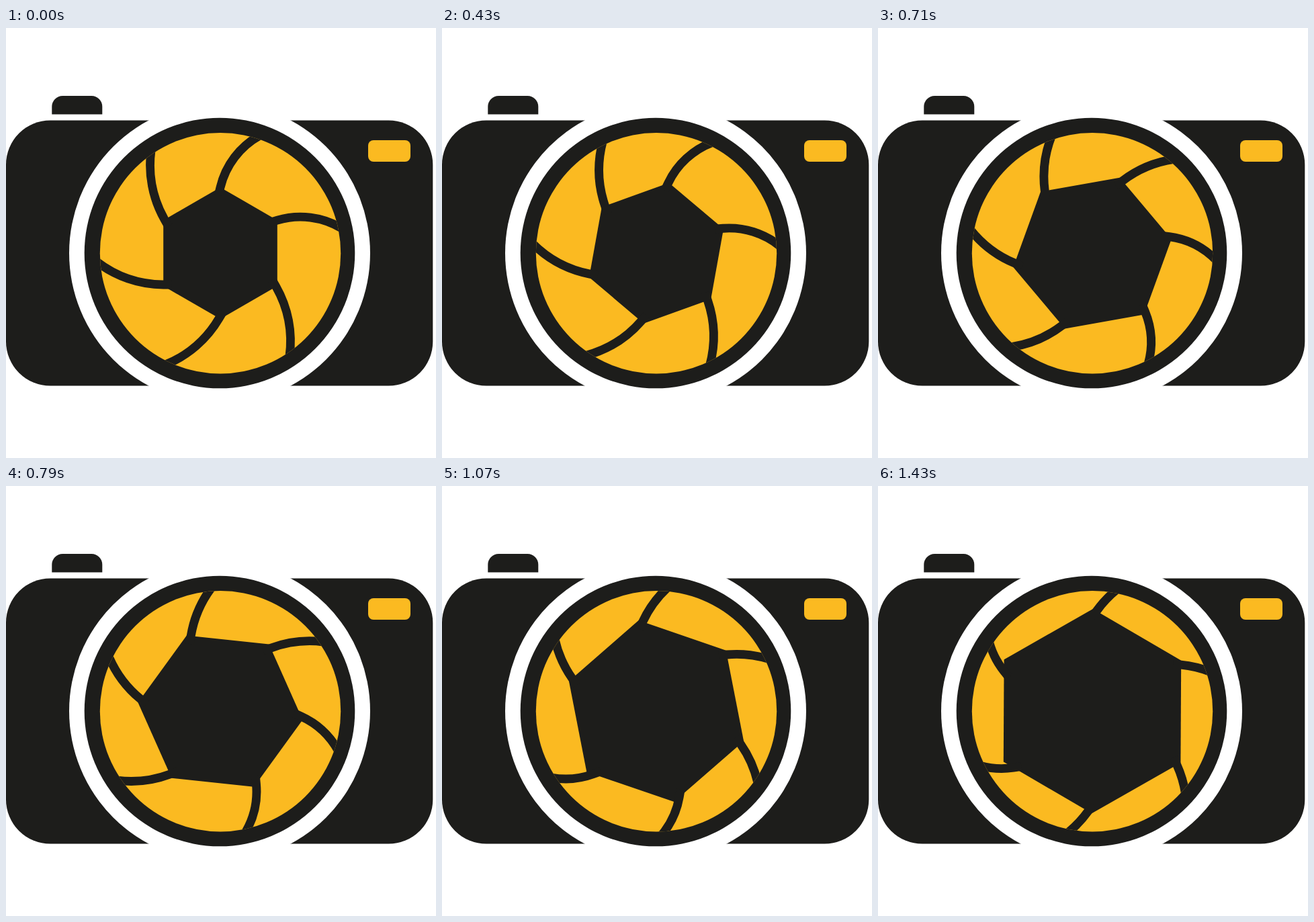
Animation, 640 px wide and 640 px high, one loop 1.93 s. Source, as an HTML page:

```html
<!DOCTYPE html>
<html lang="en">
<head>
<meta charset="utf-8">
<title>Camera shutter</title>
<style>
  html, body { margin: 0; height: 100%; overflow: hidden; background: #fff; }
  svg { display: block; width: 100%; height: 100%; }
  .ink { fill: #1d1d1b; }
  .gold { fill: #fbba21; }
  .seam { fill: none; stroke: #1d1d1b; stroke-width: 12.9; }
</style>
</head>
<body>
<svg viewBox="0 0 640 640">
  <clipPath id="lens"><circle cx="319" cy="335.2" r="179.2"/></clipPath>
  <rect class="ink" y="137.5" width="635.3" height="395" rx="66"/>
  <path class="ink" d="M68.3 128.4V117a16 16 0 0 1 16-16h43a16 16 0 0 1 16 16v11.4z"/>
  <rect class="gold" x="539" y="166.9" width="63" height="32.1" rx="8"/>
  <circle cx="318" cy="335" r="224" fill="#fff"/>
  <circle class="ink" cx="318" cy="335" r="201.3"/>
  <g clip-path="url(#lens)">
    <circle class="gold" cx="319" cy="335.2" r="181"/>
    <g id="iris"></g>
  </g>
</svg>
<script>
const LOOP = 1930, LAST = 17;
const RIM = 185, TUCK = 12, LAG = 7.6;
const RAD = Math.PI / 180;

// [step, degrees turned]
const TURNS = [[0, 0], [3, 10.2], [5, 48.7], [8, 96], [10, 134.5], [14, 201], [LAST, 240.3]];

const iris = document.getElementById('iris');
function add(tag, cls) {
  const el = document.createElementNS('http://www.w3.org/2000/svg', tag);
  el.setAttribute('class', cls);
  return iris.appendChild(el);
}
const hole = add('polygon', 'ink');
const seams = Array.from({ length: 6 }, () => add('path', 'seam'));

// A pause, then even steps of 70 ms with 10 ms more after every seventh
function stepAt(t) {
  const start = k => 290 + 70 * (k - 1) + 10 * Math.floor((k - 1) / 7);
  let step = 0;
  while (step < LAST && t >= start(step + 1)) step++;
  return step;
}

// Speed at a key; at rest at both ends
function speed(i) {
  const a = TURNS[i - 1], b = TURNS[i + 1];
  return a && b ? (b[1] - a[1]) / (b[0] - a[0]) : 0;
}

function turnAt(step) {
  let i = 0;
  while (i < TURNS.length - 2 && step >= TURNS[i + 1][0]) i++;
  const [x0, y0] = TURNS[i], [x1, y1] = TURNS[i + 1];
  const span = x1 - x0, u = (step - x0) / span;
  return y0 + (y1 - y0) * u * u * (3 - 2 * u)
    + span * u * (1 - u) * (speed(i) * (1 - u) - speed(i + 1) * u);
}

// Curved seam from a hole corner (pointing up) out to the rim
function seamPath(corner, offset, rimAngle, bend) {
  const x = offset, y = -corner + Math.abs(offset) * Math.tan(30 * RAD);
  const ex = RIM * Math.sin(rimAngle * RAD), ey = -RIM * Math.cos(rimAngle * RAD);
  const chord = Math.hypot(ex - x, ey - y);
  const dir = Math.atan2(ex - x, y - ey) - Math.asin(chord / 2 / bend);
  const sx = x - TUCK * Math.sin(dir), sy = y + TUCK * Math.cos(dir);
  return `M${sx} ${sy}L${x} ${y}A${bend} ${bend} 0 0 1 ${ex} ${ey}`;
}

function draw(step) {
  const u = step / LAST;
  const apothem = 84.8 + 47 * (u - 0.025 * Math.sin(2 * Math.PI * u));
  const corner = apothem / Math.cos(30 * RAD);
  const rimAngle = 26.2 - 15 * u ** 1.2;
  const offset = 1.8 + 3.7 * Math.min(1, 4 * u);
  const lagOffset = -15 * u ** 1.5;

  iris.setAttribute('transform', `translate(319 335.1) rotate(${turnAt(step)})`);
  hole.setAttribute('points', seams.map((_, j) =>
    `${corner * Math.sin(j * 60 * RAD)},${-corner * Math.cos(j * 60 * RAD)}`).join(' '));
  seams.forEach((seam, j) => {
    seam.setAttribute('transform', `rotate(${j * 60})`);
    seam.setAttribute('d', j < 2
      ? seamPath(corner, lagOffset, rimAngle - LAG, 120)
      : seamPath(corner, offset, rimAngle, 165));
  });
}

let shown = -1;
function tick() {
  const step = stepAt(performance.now() % LOOP);
  if (step !== shown) draw(shown = step);
  requestAnimationFrame(tick);
}
tick();
</script>
</body>
</html>
```
